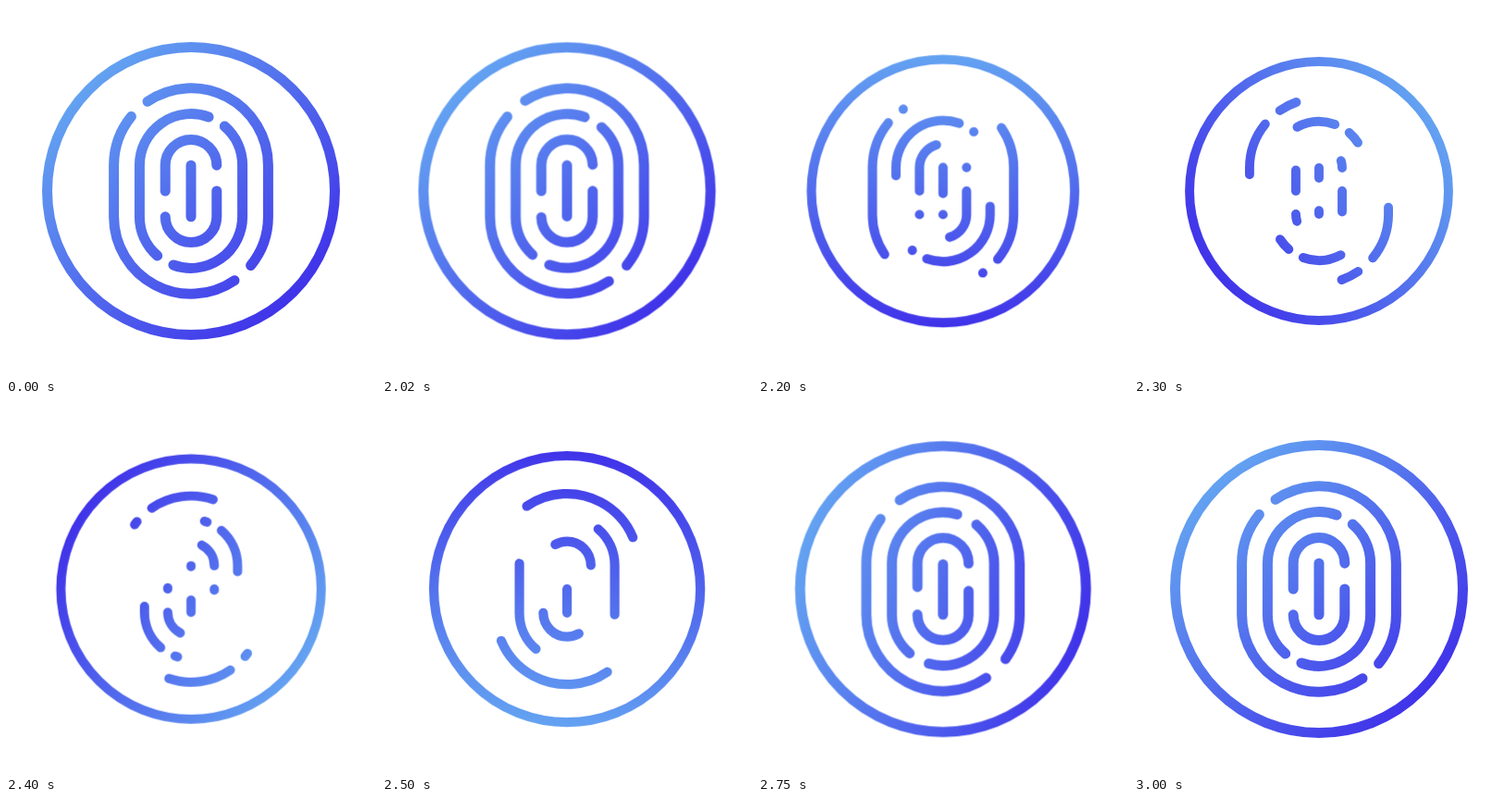
Animation, 400 px wide and 400 px high, one loop 3.02 s. Source, as an HTML page:

```html
<!DOCTYPE html>
<html lang="en">
<head>
<meta charset="utf-8">
<title>Fingerprint</title>
<style>
  html, body { margin: 0; width: 100%; height: 100%; overflow: hidden; background: #fff; }
  svg { display: block; width: 100vw; height: 100vh; }

  .icon, .tint, .old, .new {
    animation: 3020ms linear infinite;
    transform-origin: 0 0;
  }
  .icon { animation-name: press; }
  .tint { animation-name: spin; }
  .old { animation-name: erase; }
  .new { animation-name: draw; }

  .lines { fill: none; stroke: #fff; stroke-width: 11; stroke-linecap: round; }
  .old, .new { stroke-dasharray: 1 2; }

  /* 2 s rest, then about 1 s of motion */
  @keyframes press {
    0% { transform: scale(1); }
    66.225% { transform: scale(1); animation-timing-function: cubic-bezier(.333, 0, .667, 1); }
    75.066% { transform: scale(.9); }
    77.318% { transform: scale(.9); animation-timing-function: cubic-bezier(.333, 0, .667, 1); }
    93.543%, 100% { transform: scale(1); }
  }
  @keyframes spin {
    0% { transform: rotate(45deg); }
    66.225% { transform: rotate(45deg); animation-timing-function: cubic-bezier(.36, 0, .42, 1); }
    99.338%, 100% { transform: rotate(405deg); }
  }
  @keyframes erase {
    0% { stroke-dashoffset: 0; visibility: visible; }
    66.225% { stroke-dashoffset: 0; visibility: visible; animation-timing-function: cubic-bezier(.333, 0, .667, 1); }
    80.563% { stroke-dashoffset: -1; visibility: visible; }
    80.57%, 100% { stroke-dashoffset: -1; visibility: hidden; }
  }
  @keyframes draw {
    0%, 72.84% { stroke-dashoffset: 1; visibility: hidden; }
    72.848% { stroke-dashoffset: 1; visibility: visible; animation-timing-function: cubic-bezier(.333, 0, .667, 1); }
    92.715%, 100% { stroke-dashoffset: 0; visibility: visible; }
  }
</style>
</head>
<body>
<svg viewBox="-200 -200 400 400">
  <defs>
    <linearGradient id="blue" gradientUnits="userSpaceOnUse" x1="-161" x2="161" y1="0" y2="0">
      <stop offset="0" stop-color="#63a2f1"/>
      <stop offset="1" stop-color="#4033e9"/>
    </linearGradient>

    <!-- one half of the ridges; the other half is its point reflection -->
    <g id="half">
      <path pathLength="1" d="M-47 -96.7A83.4 83.4 0 0 1 83.4 -27.8V27.8A83.4 83.4 0 0 1 64.6 80.5"/>
      <path pathLength="1" d="M36.3 -70A55.6 55.6 0 0 1 55.6 -27.8V27.8A55.6 55.6 0 0 1 -19.1 80"/>
      <path pathLength="1" d="M-27.8 27.8A27.8 27.8 0 0 0 27.8 27.8V0"/>
    </g>
    <g id="print">
      <use href="#half"/>
      <use href="#half" transform="rotate(180)"/>
      <path pathLength="1" d="M0 27.8V-27.8"/>
    </g>

    <mask id="shape" maskUnits="userSpaceOnUse" x="-200" y="-200" width="400" height="400">
      <g class="lines">
        <circle r="155.5"/>
        <use class="old" href="#print"/>
        <use class="new" href="#print"/>
      </g>
    </mask>
  </defs>

  <g class="icon">
    <g mask="url(#shape)">
      <rect class="tint" x="-170" y="-170" width="340" height="340" fill="url(#blue)"/>
    </g>
  </g>
</svg>
</body>
</html>
```
